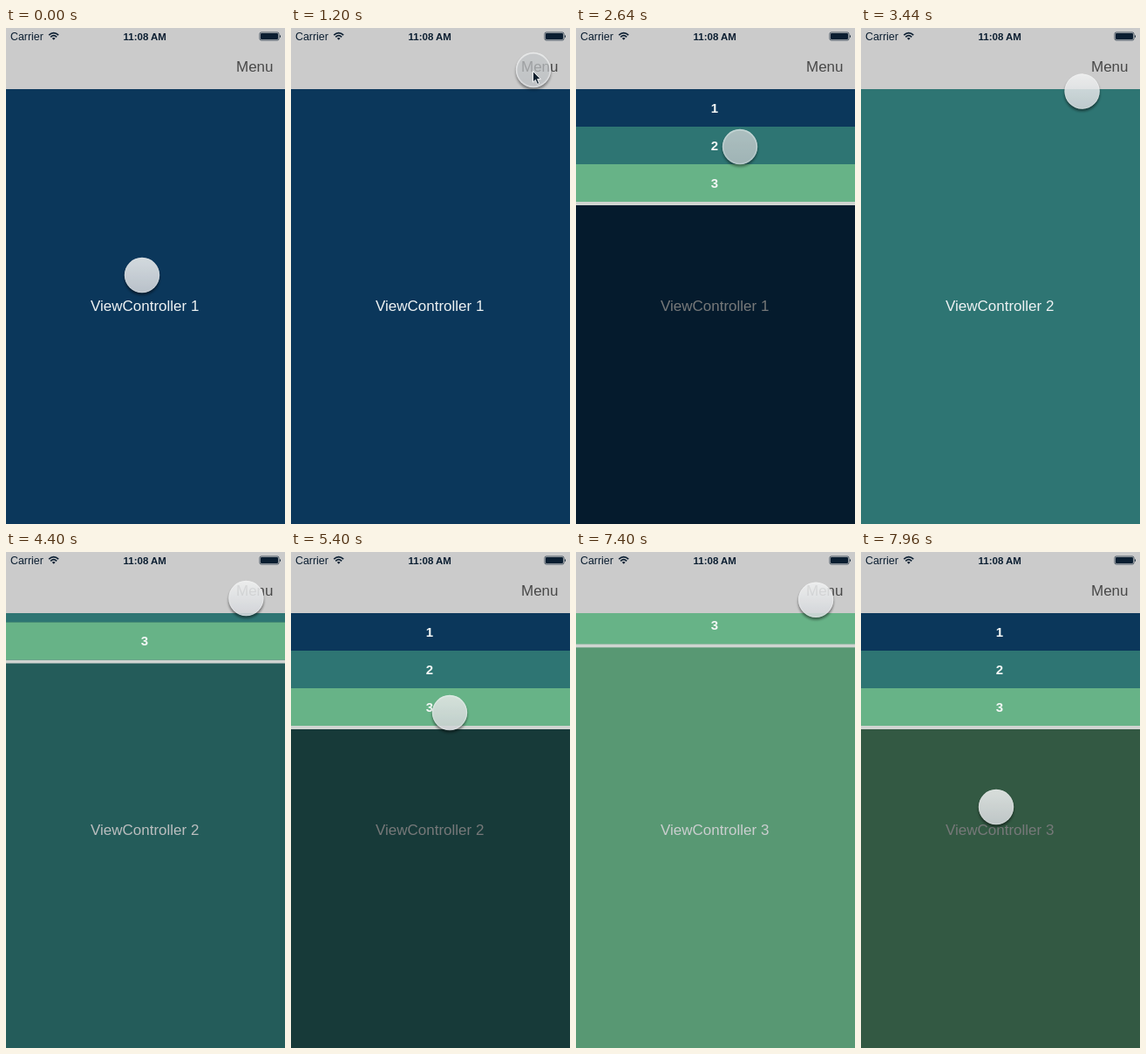
An HTML page that plays this animation: 320 by 568 pixels, repeating every 8000 ms.

```html
<!DOCTYPE html>
<html lang="en">
<head>
<meta charset="utf-8">
<title>Drop-down menu</title>
<style>
html, body { margin: 0; width: 100%; height: 100%; overflow: hidden; background: #0b375b; }
svg { display: block; width: 100%; height: 100%; }
text { font-family: "Liberation Sans", Arial, sans-serif; }
.bold { font-weight: bold; }
#rows text { font-size: 15px; font-weight: bold; fill: #f4f7f6; text-anchor: middle; }
</style>
</head>
<body>
<svg viewBox="0 0 320 568">
  <defs>
    <linearGradient id="gloss" x1="0" y1="0" x2="0" y2="1">
      <stop offset="0" stop-color="#f1f2f2"/>
      <stop offset="1" stop-color="#d3d6da"/>
    </linearGradient>
    <filter id="blur" x="-30%" y="-30%" width="160%" height="160%">
      <feGaussianBlur stdDeviation="1.4"/>
    </filter>
    <clipPath id="below"><rect y="70" width="320" height="498"/></clipPath>
  </defs>

  <rect id="page" width="320" height="568"/>
  <text id="title" x="97" y="324" font-size="17" fill="#eef2f3"></text>
  <rect id="dim" y="70" width="320" height="498"/>

  <g clip-path="url(#below)"><g id="rows"></g></g>

  <rect width="320" height="70" fill="#cbcbcb"/>
  <text x="264" y="49.5" font-size="17" fill="#484848">Menu</text>
  <g fill="#0b1e31">
    <text x="5" y="14" font-size="12.4">Carrier</text>
    <text x="134.5" y="13.5" font-size="11.5" class="bold">11:08 AM</text>
    <path d="M49.2 8.2Q54.7 3.2 60.2 8.2M51.2 10.3Q54.7 7.1 58.2 10.3"
      fill="none" stroke="#0b1e31" stroke-width="1.7"/>
    <path d="M52.8 11.7Q54.7 10.2 56.6 11.7L54.7 13.7Z"/>
    <rect x="291" y="5" width="22" height="9" rx="1.8" fill="none" stroke="#0b1e31" stroke-width=".7"/>
    <rect x="292" y="6" width="20" height="7" rx="1"/>
    <path d="M314 7.7Q316 9.5 314 11.3Z"/>
  </g>

  <g id="touch">
    <g id="disc">
      <circle cy="2.6" r="20.2" opacity=".55" filter="url(#blur)"/>
      <circle r="20.2" fill="url(#gloss)"/>
      <circle id="shade" r="18.5" fill="#b4b8ba"/>
      <circle r="19.6" fill="none" stroke="#fff" stroke-opacity=".35"/>
    </g>
    <path id="arrow" d="M-.5 1.5V14L2.4 11.4 4.5 16.4 6.7 15.4 4.6 10.6H8.4Z"
      fill="#10202e" stroke="#fff" stroke-width=".9"/>
  </g>
</svg>
<script>
const LOOP = 8000, TOP = 70, ROW = 43, MENU = 3 * ROW + 4;
const ARRIVE = 360, LEAVE = 180, PRESS = 60, DELAY = 80, SLIDE = 440;
const COLORS = ["#0b375b", "#2e7573", "#67b387"];
const $ = id => document.getElementById(id);

// The pointer rests around each stop's time and glides between stops.
const STOPS = [
  { at: -LEAVE, x: 156, y: 283 },
  { at: 1200, x: 278, y: 48, tap: true },
  { at: 2680, x: 188, y: 136, tap: true },
  { at: 4120, x: 279, y: 48, tap: true },
  { at: 5480, x: 182, y: 184, tap: true },
  { at: 6160, x: 184, y: 206 },
  { at: 7160, x: 278, y: 49, tap: true },
  { at: LOOP + ARRIVE - 40, x: 155, y: 292 }
];
const TAPS = STOPS.filter(s => s.tap).map(s => s.at);

function ramp(t, from, to) {
  const p = Math.min(1, Math.max(0, (t - from) / (to - from)));
  return (1 - Math.cos(Math.PI * p)) / 2;
}

function pointer(t) {
  const next = STOPS.findIndex(s => s.at > t);
  const a = STOPS[next - 1], b = STOPS[next];
  const p = ramp(t, a.at + LEAVE, b.at - ARRIVE);
  return [a.x + (b.x - a.x) * p, a.y + (b.y - a.y) * p];
}

// Every tap toggles the menu; each finished closing brings the next page.
function menu(t) {
  const slides = TAPS.map(tap => ramp(t, tap + DELAY, tap + DELAY + SLIDE));
  return {
    open: slides.reduce((sum, s, i) => sum + (i % 2 ? -s : s), 0),
    page: slides.filter((s, i) => i % 2 && s === 1).length
  };
}

$("rows").innerHTML =
  `<rect y="${TOP + 3 * ROW}" width="320" height="4" fill="#d0d4d1"/>` +
  COLORS.map((color, i) => {
    const y = TOP + i * ROW;
    return `<rect y="${y}" width="320" height="${ROW}" fill="${color}"/>` +
      `<text x="159" y="${y + 26.7}">${i + 1}</text>`;
  }).join("");

function draw(t) {
  const { open, page } = menu(t);
  const press = Math.max(...TAPS.map(tap => Math.exp(-(((t - tap) / PRESS) ** 2))));
  $("page").setAttribute("fill", COLORS[page]);
  $("title").textContent = `ViewController ${page + 1}`;
  $("dim").setAttribute("opacity", open * .5);
  $("rows").setAttribute("transform", `translate(0 ${(open - 1) * MENU})`);
  $("touch").setAttribute("transform", `translate(${pointer(t)})`);
  $("disc").setAttribute("opacity", .87 - .17 * press);
  $("shade").setAttribute("opacity", .7 * press);
  $("arrow").setAttribute("opacity", Math.abs(t - TAPS[0]) < 200 ? 1 : 0);
}

const start = performance.now();
function tick() {
  draw((performance.now() - start) % LOOP);
  requestAnimationFrame(tick);
}
draw(0);
requestAnimationFrame(tick);
</script>
</body>
</html>
```
